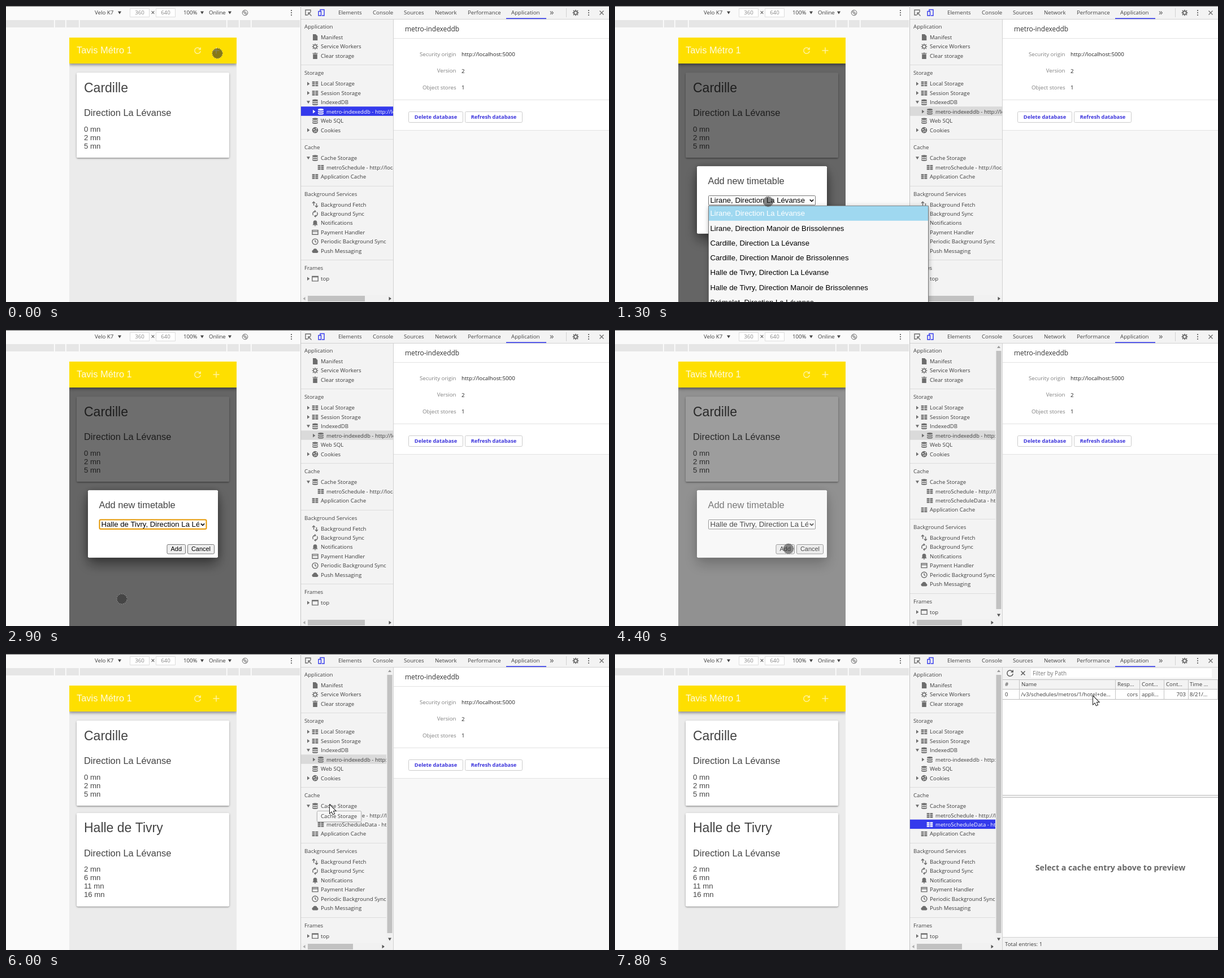
Write an HTML page with a canvas that moves like this. It is 1067x525 px and loops after 8000 ms.

```html
<!DOCTYPE html>
<html lang="en">
<head>
<meta charset="utf-8">
<title>Cached timetables</title>
<style>
  html, body { margin: 0; width: 1067px; height: 525px; overflow: hidden; background: #fff; }
  canvas { display: block; }
</style>
</head>
<body>
<canvas id="stage" width="1067" height="525"></canvas>
<script>
const LOOP = 8000, STEP = 100;
const UI = '"Open Sans", sans-serif', APP = '"Liberation Sans", Arial, sans-serif';
const BLUE = '#343aec', GREY = '#6e6e6e', PANEL = '#f3f3f3', LINE = '#d2d2d2';

const main = document.getElementById('stage').getContext('2d');
const layer = main.canvas.cloneNode().getContext('2d');
let g = main;

const WEST = 'Direction La Lévanse', EAST = 'Direction Manoir de Brissolennes';
const OPTIONS = ['Lirane', 'Cardille', 'Halle de Tivry', 'Brémolet']
  .flatMap(stop => [`${stop}, ${WEST}`, `${stop}, ${EAST}`]).slice(0, 7);

// Icons centred on 0,0; those in STROKED are outlines.
const ring = r => `M${-r} 0a${r} ${r} 0 1 0 ${2 * r} 0a${r} ${r} 0 1 0 ${-2 * r} 0z`;
const ICONS = {
  file: 'M-4-5.5h5l3.3 3.3v7.8h-8.3z',
  gear: ring(2.9) + 'M-5.3 0h2M3.3 0h2M0-5.3v2M0 3.3v2M-4-4l1.6 1.6M4 4l-1.6-1.6M-4 4l1.6-1.6M4-4l-1.6 1.6',
  trash: 'M-4.5-5h3l1-1h1l1 1h3v1.3h-9zM-3.8-2.8h7.6v8.3h-7.6z',
  grid: [-4.2, -1.1, 2].map(y => `M-5.3 ${y}h4.8v2.3h-4.8zM.5 ${y}h4.8v2.3h-4.8z`).join(''),
  db: 'M-5-3.4a5 1.9 0 0 1 10 0a5 1.9 0 0 1-10 0M-5-2a5 1.9 0 0 0 10 0v1.9a5 1.9 0 0 1-10 0zM-5 1.4a5 1.9 0 0 0 10 0v2a5 1.9 0 0 1-10 0z',
  cookie: ring(5.3) + 'M-3-2h2v2h-2zM1-3.5h2v2h-2zM.5.5h2v2h-2zM-2 2h1.5v1.5h-1.5z',
  updown: 'M-2.5 2v-6.5M-5-2.3l2.5-2.5l2.5 2.5M2.5-2v6.5M0 2.3l2.5 2.5l2.5-2.5',
  sync: 'M-3.3 2.8a4.3 4.3 0 0 1 3-7M3.3-2.8a4.3 4.3 0 0 1-3 7M-1-6l2 1.8l-2 1.8M1 2.4l-2 1.8l2 1.8',
  bell: 'M-4.8 3.5l1.4-1.5v-3a3.4 3.6 0 0 1 6.8 0v3l1.4 1.5zM-1.3 4.2h2.6v1.2h-2.6z',
  card: 'M-5-3.8h10v7.6h-10zM-5-1.3h10',
  clock: ring(5) + 'M0-3v3l2.2 1.3',
  cloud: 'M-3.3 3.8a2.8 2.8 0 0 1-.4-5.4a4 4 0 0 1 7.5.6a2.5 2.5 0 0 1-.2 4.8z',
  frame: 'M-5.2-4.3h10.4v8.4h-10.4zM-5.2-3.3h10.4',
  reload: 'M4.6-2.4a5.2 5.2 0 1 0 .6 3.2M5.2-5.6v3.6h-3.6',
  plus: 'M-5.5 0h11M0-5.5v11',
  cross: 'M-3.5-3.5l7 7M3.5-3.5l-7 7',
  chevron: 'M-3.2-1.6l3.2 3.2l3.2-3.2',
  inspect: 'M-1 4h-4v-9h9v4M0 0l5.5 5.5M0 4v-4h4',
  device: 'M-2-3v-2.5h7v10.5h-4M-5-2.5h4.5v7.5h-4.5z',
  rotate: ring(4.8) + 'M-3.4-3.4l6.8 6.8M-1.5-3.5l5 5M-3.5-1.5l5 5',
  dots: 'M-1-5h2v2h-2zM-1-1h2v2h-2zM-1 3h2v2h-2z',
  down: 'M-3-2.5h6l-3 5z',
  right: 'M-2-3.3l4.4 3.3l-4.4 3.3z',
  left: 'M2-3l-4 3l4 3z',
  up: 'M-3 2h6l-3-4z',
  arrow: 'M0 0v14l3.3-3l2.3 5.3l2.3-1l-2.3-5.2h4.4z'
};
const STROKED = new Set('gear updown sync card clock frame reload plus cross chevron inspect device rotate'.split(' '));

function text(s, x, cy, size = 9.7, color = '#3c3c3c', { font = UI, weight = 400, align = 'left' } = {}) {
  g.font = `${weight} ${size}px ${font}`;
  g.textAlign = align;
  g.fillStyle = color;
  g.fillText(s, x, cy + size * 0.36);
}

const app = (s, x, cy, size = 13.16, color = '#444') => text(s, x, cy, size, color, { font: APP });

function icon(name, x, y, color = GREY, width = 1.4) {
  const path = new Path2D(ICONS[name]);
  g.save();
  g.translate(x, y);
  g.fillStyle = g.strokeStyle = color;
  g.lineWidth = width;
  STROKED.has(name) ? g.stroke(path) : g.fill(path, 'evenodd');
  g.restore();
}

function rect(x, y, w, h, color) {
  g.fillStyle = color;
  g.fillRect(x, y, w, h);
}

function box(x, y, w, h, fill, { r = 2, border, width = 1, shadows = [] } = {}) {
  g.beginPath();
  g.roundRect(x, y, w, h, r);
  g.fillStyle = fill;
  for (const [dy, blur, alpha] of shadows) {
    g.save();
    g.shadowColor = `rgba(0,0,0,${alpha})`;
    g.shadowOffsetY = dy;
    g.shadowBlur = blur;
    g.fill();
    g.restore();
  }
  g.fill();
  if (border) {
    g.strokeStyle = border;
    g.lineWidth = width;
    g.stroke();
  }
}

function clipped(x, y, w, h, draw) {
  g.save();
  g.beginPath();
  g.rect(x, y, w, h);
  g.clip();
  draw();
  g.restore();
}

// cubic-bezier(.4, 0, .2, 1)
function ease(x) {
  if (x <= 0 || x >= 1) return x <= 0 ? 0 : 1;
  let lo = 0, hi = 1, s;
  for (let i = 0; i < 20; i++) {
    s = (lo + hi) / 2;
    const bx = 1.2 * s * (1 - s) ** 2 + 0.6 * s * s * (1 - s) + s ** 3;
    if (bx < x) lo = s; else hi = s;
  }
  return s * s * (3 - 2 * s);
}

function toolbars() {
  rect(0, 0, 521, 525, '#fafafa');
  text('Velo K7', 157, 12);
  text('100%', 314, 12);
  text('Online', 359, 12);
  for (const x of [201, 347, 396]) icon('down', x, 12, '#444');
  for (const [s, x] of [['360', 219.5], ['640', 265.5]]) {
    box(x, 4.5, 34, 15, '#fff', { border: '#ddd', r: 0 });
    text(s, x + 17, 12, 9.7, '#888', { align: 'center' });
  }
  text('×', 260, 12, 12, '#444', { align: 'center' });
  icon('rotate', 423, 12, GREY, 1);
  icon('dots', 505, 12);
  rect(0, 25, 520, 13, '#e6e6e6');
  for (const x of [85, 105, 129, 390, 412, 433]) rect(x, 25, 1.5, 13, '#fff');

  rect(521, 0, 546, 23, PANEL);
  rect(521, 23, 546, 1, LINE);
  icon('inspect', 535, 12);
  icon('device', 558, 12, BLUE);
  const tabs = { Elements: 588, Console: 649, Sources: 704, Network: 759, Performance: 817, Application: 894 };
  for (const name in tabs) text(name, tabs[name], 12, 9.7, '#444');
  rect(885, 21.4, 71, 1.6, BLUE);
  text('»', 962, 11, 15, '#555');
  rect(991, 4, 1, 16, LINE);
  icon('gear', 1008, 12, GREY, 1.9);
  icon('dots', 1031, 12);
  icon('cross', 1054, 12);
  rect(0, 0, 1067, 1, '#6b6b6b');
}

function card(y, stop, minutes) {
  box(125, y, 270, 106 + minutes.length * 14.8, '#fff', { shadows: [[1.6, 2, 0.25], [1, 4, 0.2]] });
  app(stop, 138, y + 26, 23);
  app(WEST, 138, y + 71, 16.44);
  minutes.forEach((m, i) => app(m + ' mn', 138, y + 99.5 + i * 14.9));
}

function dialog(t) {
  const focus = t >= 2900 && t < 4400;
  g.clearRect(0, 0, 1067, 525);
  rect(112, 102, 296, 423, 'rgba(0,0,0,.57)');
  clipped(112, 102, 296, 423, () =>
    box(145, 284.5, 230, 119, '#fff', { shadows: [[0, 11.5, 0.24], [11.5, 23, 0.48]] }));
  app('Add new timetable', 164.5, 310, 16.44);
  box(165.5, 336.5, 189, 16.5, '#fff', focus ? { border: '#e59700', width: 2 } : { border: '#767676', r: 1 });
  clipped(166, 337, 176, 16, () => app(OPTIONS[t < 2900 ? 0 : 4], 168.5, 344.5, 13.16, '#000'));
  icon('chevron', 348, 345, '#111', 1.8);
  for (const [s, x, w] of [['Add', 285, 32.5], ['Cancel', 321.5, 47]]) {
    box(x, 380.5, w, 16.5, '#efefef', { border: '#777' });
    text(s, x + w / 2, 388.5, 10.96, '#000', { font: APP, align: 'center' });
  }
}

function phone(t) {
  rect(112, 56, 296, 469, '#ebebeb');
  card(118.5, 'Cardille', [0, 2, 5]);
  if (t >= 5300) card(282.2, 'Halle de Tivry', [2, 6, 11, 16]);

  const opacity = ease((t - 305) / 333) - ease((t - 4305) / 333);
  if (opacity > 0) {
    g = layer;
    dialog(t);
    g = main;
    g.globalAlpha = opacity;
    g.drawImage(layer.canvas, 0, 0);
    g.globalAlpha = 1;
  }
  clipped(112, 56, 296, 80, () =>
    box(112, 56, 296, 46, '#fedf00', { r: 0, shadows: [[3, 4, 0.25], [1.6, 7, 0.2]] }));
  app('Tavis Métro 1', 125, 78, 16.44, '#fffbe0');
  icon('reload', 339, 79, '#fff3a0', 1.5);
  icon('plus', 372, 79, '#fff3a0', 1.5);
}

function sidebar(t) {
  const cached = t >= 4400, right = cached ? 673 : 685;
  // [icon, label, disclosure, depth]
  const sections = {
    Application: [['file', 'Manifest'], ['gear', 'Service Workers'], ['trash', 'Clear storage']],
    Storage: [['grid', 'Local Storage', 'right'], ['grid', 'Session Storage', 'right'], ['db', 'IndexedDB', 'down'],
      ['db', 'metro-indexeddb - http://localhost:5000', 'right', 1], ['db', 'Web SQL'], ['cookie', 'Cookies', 'right']],
    Cache: [['db', 'Cache Storage', 'down'], ['grid', 'metroSchedule - http://localhost:5000', '', 1],
      ...(cached ? [['grid', 'metroScheduleData - http://localhost:5000', '', 1]] : []), ['grid', 'Application Cache']],
    'Background Services': [['updown', 'Background Fetch'], ['sync', 'Background Sync'], ['bell', 'Notifications'],
      ['card', 'Payment Handler'], ['clock', 'Periodic Background Sync'], ['cloud', 'Push Messaging']],
    Frames: [['frame', 'top', 'right']]
  };
  const selected = t < 6900 ? 'metro-indexeddb' : 'metroScheduleData';
  const active = t < 200 || t >= 6900;
  const pitch = 16.45;

  rect(521, 24, 165, 501, PANEL);
  clipped(521, 24, right - 521, 489, () => {
    let y = 36.5;
    for (const name in sections) {
      if (y > 40) rect(521, Math.round(y - 14.5), 165, 1, '#dcdcdc');
      text(name, 528, y, 9.7, '#444');
      y += 19;
      for (const [glyph, label, disclosure, depth = 0] of sections[name]) {
        const on = label.startsWith(selected + ' ');
        if (on) rect(521, y - 8.9, 165, pitch, active ? BLUE : '#dadada');
        const white = on && active && '#fff', x = 547 + depth * 10;
        if (disclosure) icon(disclosure, x - 12, y, white || GREY);
        icon(glyph, x, y, white || GREY);
        text(label, x + 10, y, 9.65, white || '#3c3c3c');
        y += pitch;
      }
      y += 14.05;
    }
  });
  rect(521, 513, 165, 12, '#f1f1f1');
  rect(534, 514, cached ? 80 : 101, 10, '#c1c1c1');
  icon('left', 527.5, 519, '#aaa');
  icon('right', right - 5.5, 519, '#555');
  if (cached) {
    rect(673, 24, 12, 501, '#f1f1f1');
    rect(674.5, 37, 9, 458, '#c1c1c1');
    icon('up', 679, 30, '#999');
    icon('down', 679, 506, '#555');
  }
  rect(521, 0, 1, 525, '#c4c4c4');
  rect(685, 24, 1, 501, LINE);
}

function databaseView() {
  rect(686, 24, 381, 501, '#f8f8f8');
  rect(686, 24, 381, 196, '#fff');
  for (const y of [57, 166, 220]) rect(686, y, 381, 1, '#e2e2e2');
  text('metro-indexeddb', 706, 40.5, 11.9, '#333');
  [['Security origin', 'http://localhost:5000'], ['Version', '2'], ['Object stores', '1']].forEach(([key, value], i) => {
    const y = 85.3 + i * 29.7;
    text(key, 796.5, y, 9.7, '#808080', { align: 'right' });
    text(value, 806, y, 9.8, '#222');
  });
  for (const [s, x, w] of [['Delete database', 712.5, 96], ['Refresh database', 812.5, 101]]) {
    box(x, 187.5, w, 19, '#fff', { border: '#ccc' });
    text(s, x + w / 2, 197, 9.3, '#3c34dc', { weight: 700, align: 'center' });
  }
}

function cacheView() {
  rect(686, 24, 381, 501, '#fff');
  rect(686, 24, 381, 39, PANEL);
  icon('reload', 699, 34, '#5a5a5a', 1.5);
  icon('cross', 722, 34, '#5a5a5a', 1.5);
  rect(736, 26, 320, 16, '#fff');
  text('Filter by Path', 739, 34, 9.9, '#777');
  for (const y of [45, 62, 80, 250, 254]) rect(686, y, 381, 1, '#bdbdbd');
  rect(686, 251, 381, 3, PANEL);
  for (const x of [715, 885, 928, 971, 1014, 1066]) rect(x, 45, 1, 36, '#c4c4c4');
  ['#', 'Name', 'Resp…', 'Cont…', 'Cont…', 'Time …'].forEach((s, i) =>
    text(s, [690, 719, 889, 932, 975, 1017][i], 54));
  text('0', 690, 71.5);
  text('/v3/schedules/metros/1/hotel+de…', 718.5, 71.5);
  text('cors', 925, 71.5, 9.7, '#3c3c3c', { align: 'right' });
  text('appli…', 932, 71.5);
  text('703', 1010, 71.5, 9.7, '#3c3c3c', { align: 'right' });
  text('8/21/…', 1017, 71.5);
  text('Select a cache entry above to preview', 876.5, 379, 14.2, '#686868', { weight: 700, align: 'center' });
  rect(686, 502, 381, 23, PANEL);
  rect(686, 502, 381, 1, LINE);
  text('Total entries: 1', 690, 514.5);
}

function dropdown(t) {
  const picked = t < 2600 ? 0 : 4;
  box(165.5, 354.5, 389, 190, '#f7f7f7', { r: 0, border: '#777', shadows: [[1, 9, 0.35]] });
  OPTIONS.forEach((s, i) => {
    const y = 367.5 + i * 26.3;
    if (i === picked) rect(166, y - 12.7, 388, 26, '#9fd8f0');
    app(s, 168.5, y, 13.16, i === picked ? '#fff' : '#000');
  });
}

function tooltip(s, x, y) {
  g.font = `9.65px ${UI}`;
  box(x + 0.5, y + 0.5, g.measureText(s).width + 14, 19, '#f6f6f6', { border: '#b8b8b8', shadows: [[1, 3, 0.2]] });
  text(s, x + 7, y + 10, 9.65);
}

// time, x, y
const PATH = [
  [0, 374, 84], [200, 372, 82], [300, 372, 82], [400, 372, 79], [900, 271, 347], [1600, 271, 347],
  [2500, 216, 485], [2600, 205, 477], [3000, 205, 477], [3700, 307, 388], [5200, 307, 388],
  [5800, 575, 262], [6000, 573, 268], [6100, 574, 270], [6500, 583, 300], [7200, 583, 300],
  [7800, 846, 75], [8000, 846, 75]
];

function pointer(t) {
  const i = PATH.findIndex(p => p[0] > t);
  const [t0, x0, y0] = PATH[i - 1], [t1, x1, y1] = PATH[i];
  const u = (t - t0) / (t1 - t0), k = u * u * (3 - 2 * u);
  const x = x0 + (x1 - x0) * k, y = y0 + (y1 - y0) * k;

  if (x > 408) {
    const arrow = new Path2D(ICONS.arrow);
    g.save();
    g.translate(x, y);
    g.strokeStyle = '#222';
    g.lineWidth = 2;
    g.stroke(arrow);
    g.fillStyle = '#fff';
    g.fill(arrow);
    g.restore();
    return;
  }
  const pressed = t < 100 || (t >= 1100 && t < 1400) || (t >= 2700 && t < 2900);
  g.save();
  g.beginPath();
  g.arc(x, y, 9, 0, 7);
  g.fillStyle = `rgba(40,40,40,${pressed ? 0.56 : 0.52})`;
  g.fill();
  g.lineWidth = 1;
  g.setLineDash([1.5, 1.5]);
  for (const [color, offset] of [['rgba(0,0,0,.6)', 0], ['rgba(255,255,255,.65)', 1.5]]) {
    g.strokeStyle = color;
    g.lineDashOffset = offset;
    g.stroke();
  }
  g.restore();
}

function draw() {
  const t = Math.floor(performance.now() % LOOP / STEP) * STEP;
  toolbars();
  phone(t);
  sidebar(t);
  t < 6900 ? databaseView() : cacheView();
  if (t >= 1300 && t < 2900) dropdown(t);
  if (t >= 6000 && t < 6200) tooltip('Cache Storage', 550, 278);
  if (t >= 6700 && t < 6900) tooltip('metroScheduleData - http://localhost:5000', 592, 305);
  pointer(t);
  requestAnimationFrame(draw);
}
draw();
</script>
</body>
</html>
```
